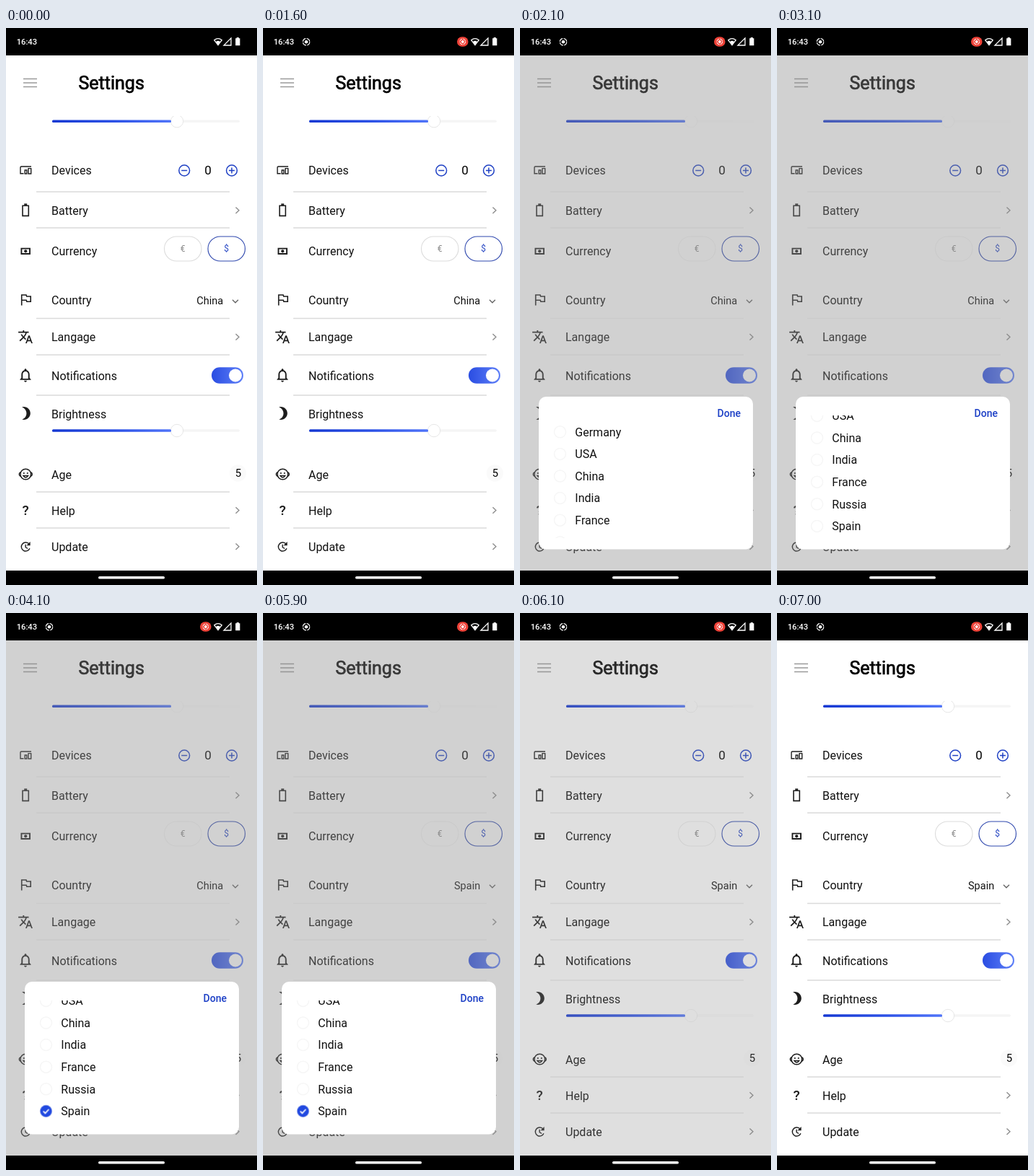
These frames come from a looping animation (348x772 px, 8000 ms). An HTML page:

```html
<!DOCTYPE html>
<html lang="en">
<head>
<meta charset="utf-8">
<title>Settings</title>
<style>
  html, body { margin: 0; width: 100%; height: 100%; overflow: hidden; background: #fff; }
  svg { display: block; width: 348px; height: 772px; font-family: Roboto, "Noto Sans", sans-serif; }
  .line { fill: none; stroke: #1c1c1c; stroke-width: 1.6; }
  .label { font-size: 16px; fill: #111; }
  .blue { fill: none; stroke: #1f40c4; stroke-width: 1.5; }
  .arrow { fill: none; stroke: #8e8e8e; stroke-width: 1.4; }
  .knob { fill: #fff; stroke: #e6e6e6; stroke-width: 1; }
  .pill { fill: #fff; stroke-width: 1.1; }
</style>
</head>
<body>
<svg viewBox="0 0 348 772" xmlns="http://www.w3.org/2000/svg">
  <defs>
    <linearGradient id="fill" gradientUnits="userSpaceOnUse" x1="64" y1="0" x2="237" y2="0">
      <stop offset="0" stop-color="#1538d2"/><stop offset=".5" stop-color="#2c51e6"/><stop offset="1" stop-color="#5478fb"/>
    </linearGradient>
    <linearGradient id="toggle"><stop offset="0" stop-color="#2a4de2"/><stop offset="1" stop-color="#5f80f8"/></linearGradient>
    <clipPath id="page"><rect y="122" width="348" height="630"/></clipPath>
    <clipPath id="view"><rect x="26" y="537.5" width="297" height="169"/></clipPath>
  </defs>
  <rect width="348" height="772" fill="#fff"/>

  <path d="M24 70.5h19M24 76h19M24 81.5h19" stroke="#9a9a9a" stroke-width="1.7"/>
  <text x="100.5" y="84.5" font-size="25" stroke="#000" stroke-width=".7">Settings</text>
  <g id="soft"></g>
  <g id="rows"></g>

  <!-- row icons -->
  <g class="line">
    <path d="M35 192H21.2q-1.2 0-1.2 1.2V201.7H24.5M26.2 197h2.6v5h-2.6zM31 194.6h3.7v7.4H31z" stroke-width="1.4"/>
    <path d="M23 246.2h8.3v14.2H23z"/>
    <path d="M25.2 244.6h4" stroke-width="2.4"/>
    <path d="M21.4 305.6h11.6v7.4H21.4z" stroke-width="1.9"/>
    <path d="M21.7 384.5V370h6.3l.6 2h5.6v7.2h-5.4l-.6-2h-6.5"/>
    <g stroke-width="1.5">
      <circle cx="27.3" cy="618.5" r="7.3"/>
      <path d="M20.6 615.6a3 3 0 0 0 0 5.8M34 615.6a3 3 0 0 1 0 5.8M24 620.6q3.3 4.6 6.6 0z"/>
      <path d="M32.9 721.2A6 6 0 1 1 31.4 714.6M27.1 715.7v4l3 1.8" stroke-width="1.4"/>
    </g>
  </g>
  <g fill="#1c1c1c">
    <circle cx="27.2" cy="309.3" r="2.1"/>
    <circle cx="24.8" cy="617" r="1.1"/><circle cx="29.8" cy="617" r="1.1"/>
    <path d="M33.6 712v5.2h-5.2z"/>
    <path transform="translate(16.2 417.2) scale(.9)" d="M12.87 15.07l-2.54-2.51.03-.03c1.74-1.94 2.98-4.17 3.71-6.53H17V4h-7V2H8v2H1v2h11.17C11.5 7.92 10.44 9.75 9 11.35 8.07 10.32 7.3 9.19 6.69 8h-2c.73 1.63 1.73 3.17 2.98 4.56l-5.09 5.02L4 19l5-5 3.11 3.11zM18.5 10h-2L12 22h2l1.12-3h4.75L21 22h2zM15.88 17l1.62-4.33L19.12 17z"/>
    <path transform="translate(15.6 469.8) scale(.95)" d="M12 22c1.1 0 2-.9 2-2h-4c0 1.1.9 2 2 2zm6-6v-5c0-3.07-1.64-5.64-4.5-6.32V4c0-.83-.67-1.5-1.5-1.5s-1.5.67-1.5 1.5v.68C7.63 5.36 6 7.92 6 11v5l-2 2v1h16v-1zm-2 1H8v-6c0-2.48 1.51-4.5 4-4.5s4 2.02 4 4.5z"/>
    <path transform="translate(16.7 523.2) scale(.9)" d="M9 2c-1 0-2 .16-3 .46 4.06 1.27 7 5.06 7 9.54s-2.94 8.27-7 9.54c1 .3 2 .46 3 .46 5.52 0 10-4.48 10-10S14.52 2 9 2z"/>
    <text x="27" y="675" font-size="19" font-weight="500" text-anchor="middle">?</text>
  </g>

  <!-- row controls -->
  <g class="blue">
    <circle cx="247.2" cy="197.5" r="7.4"/><path d="M243.2 197.5h8"/>
    <circle cx="313" cy="197.5" r="7.4"/><path d="M309 197.5h8M313 193.5v8"/>
  </g>
  <text x="280" y="203.3" font-size="17" text-anchor="middle">0</text>
  <rect class="pill" x="280" y="289" width="51.5" height="34" rx="17" stroke="#2f48ae"/>
  <g font-size="12" text-anchor="middle">
    <text x="245" y="310" fill="#858585">€</text><text x="305.5" y="310" fill="#2747c4">$</text>
  </g>
  <g font-size="14.5" text-anchor="end" fill="#111">
    <text id="before" x="301.2" y="383">China</text><text id="after" x="301.2" y="383">Spain</text>
  </g>
  <path class="arrow" d="M314 376.7l4 4 4-4" style="stroke:#666"/>
  <rect x="285" y="470.3" width="44" height="22.4" rx="11.2" fill="url(#toggle)"/>
  <circle cx="318" cy="481.5" r="9" fill="#fff"/>
  <text x="322" y="622" font-size="15" text-anchor="middle">5</text>

  <rect id="dim" y="38" width="348" height="714" fill="#8c8c8c" fill-opacity=".4"/>

  <g id="sheet">
    <rect x="26" y="511" width="297" height="211.5" rx="10" fill="#fff"/>
    <g clip-path="url(#view)"><g id="list"></g></g>
    <text x="306" y="539" font-size="14" font-weight="500" fill="#1c3fc6" text-anchor="end">Done</text>
  </g>

  <!-- system bars -->
  <rect width="348" height="38"/>
  <rect y="752" width="348" height="20"/>
  <rect x="128" y="760" width="92" height="3.6" rx="1.8" fill="#fff"/>
  <g fill="#fff">
    <text x="14.7" y="23" font-size="11.2" font-weight="500">16:43</text>
    <path d="M302 24h10V14z" fill="none" stroke="#fff" stroke-width="1.3"/>
    <path d="M288.8 16.8q5.2-4.4 10.4 0L294 23.6z" fill="none" stroke="#fff" stroke-width="1.3"/>
    <path d="M291 19q3-2.3 6 0l-3 4z"/>
    <path d="M319.8 13h3v1.3h1.6v10h-6.2v-10h1.6z"/>
  </g>
  <g id="rec">
    <circle cx="60" cy="19.2" r="4.7" fill="none" stroke="#fff" stroke-width="1.2" stroke-dasharray="6 1.38"/>
    <circle cx="60" cy="19.2" r="2.3" fill="#fff"/>
    <rect x="269" y="12.2" width="15.6" height="13.6" rx="6.8" fill="#ef4238"/>
    <circle cx="276.8" cy="19" r="3.9" fill="none" stroke="#fff" stroke-width="1" stroke-dasharray="5 1.12"/>
    <circle cx="276.8" cy="19" r="1.9" fill="#fff"/>
  </g>
</svg>
<script>
const $ = id => document.getElementById(id);
const LOOP = 8000, PITCH = 30.6;

const labels = [["Devices", 203], ["Battery", 259], ["Currency", 315], ["Country", 382.7], ["Langage", 434.3],
  ["Notifications", 487.7], ["Brightness", 540.5], ["Age", 625], ["Help", 674.6], ["Update", 724.7]];
const chevrons = [252.7, 428.3, 668.5, 718.7];
const dividers = [227, 277, 402.5, 453, 509, 643, 693];
const countries = ["Germany", "USA", "China", "India", "France", "Russia", "Spain"];

$("rows").innerHTML =
  labels.map(([s, y]) => `<text class="label" x="63" y="${y}">${s}</text>`).join("") +
  chevrons.map(y => `<path class="arrow" d="M318.5 ${y - 4.3}l4.5 4.3-4.5 4.3"/>`).join("") +
  [129.2, 558].map(y => `<rect x="64" y="${y - 1.8}" width="165" height="3.6" rx="1.5" fill="url(#fill)"/>`).join("");

const slider = y => `<rect x="228" y="${y - 1.8}" width="96" height="3.6" rx="1.8" fill="#f5f5f5"/>
  <circle class="knob" cx="237" cy="${y}" r="8.7"/>`;
$("soft").innerHTML =
  dividers.map(y => `<path d="M42 ${y}h268" stroke="#dadada" stroke-width="1.5"/>`).join("") +
  `<g clip-path="url(#page)">${slider(129.2)}${slider(558)}</g>
  <rect class="pill" x="219.5" y="289" width="51.5" height="34" rx="17" stroke="#dcdcdc"/>
  <circle cx="321.5" cy="617" r="11.7" fill="#fafafa"/>`;

$("list").innerHTML = countries.map((s, i) => {
  const y = 565.5 + i * PITCH;
  return `<circle cx="55.5" cy="${y - 5.7}" r="8" fill="none" stroke="#f6f6f6" stroke-width="1.5"/>
    <text class="label" x="76.3" y="${y}">${s}</text>`;
}).join("") + `<g id="check" transform="translate(55.5 ${559.8 + 6 * PITCH})">
  <circle r="8.2" fill="#2149e0"/><path d="M-3.8 .2l2.7 2.7 5-5.4" fill="none" stroke="#fff" stroke-width="1.7"/></g>`;

// Each entry [ms, value] holds until the next one.
function hold(id, prop, steps) {
  const frames = [...steps, [LOOP, steps.at(-1)[1]]]
    .map(([ms, v]) => ({ offset: ms / LOOP, [prop]: v, easing: "step-end" }));
  $(id).animate(frames, { duration: LOOP, iterations: Infinity });
}

const dim = [[0, 0], [1700, .25], [1800, .6], [1900, .85], [2000, 1],
  [6100, .7], [6200, .45], [6300, .26], [6400, .13], [6500, .05], [6600, 0]];
hold("dim", "opacity", dim);
hold("soft", "opacity", dim.map(([ms, v]) => [ms, 1 - .65 * v]));
hold("sheet", "opacity", [[0, 0], [1800, .45], [1900, .85], [2000, 1], [6100, 0]]);
hold("list", "transform", [[0, "translateY(0px)"], [3000, "translateY(-36px)"], [3100, "translateY(-53px)"]]);
hold("check", "opacity", [[0, 0], [4000, .5], [4100, 1]]);
hold("before", "opacity", [[0, 1], [5900, 0]]);
hold("after", "opacity", [[0, 0], [5900, 1]]);
hold("rec", "opacity", [[0, 0], [100, .5], [200, .8], [300, .95], [400, 1]]);
</script>
</body>
</html>
```
